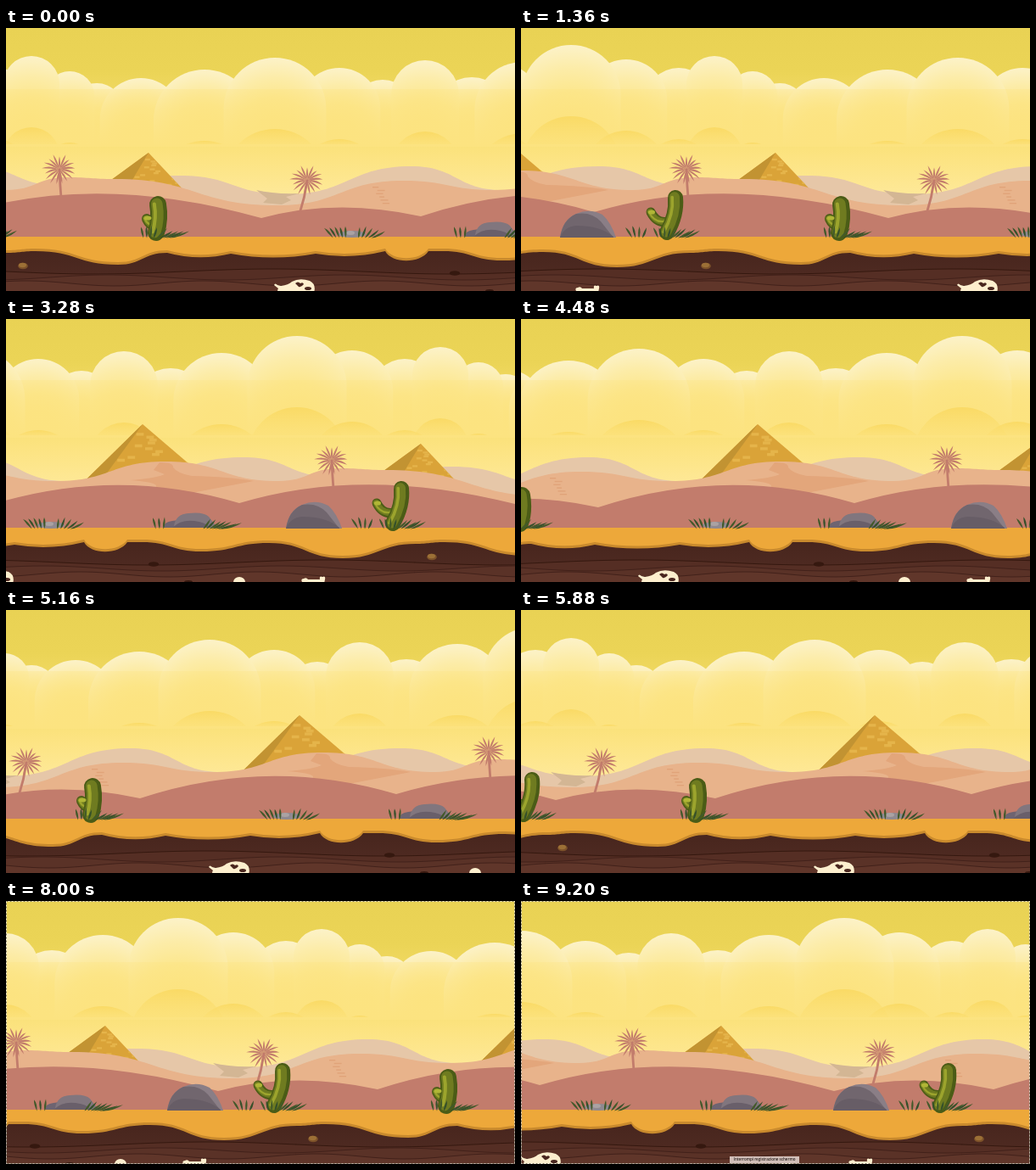
An HTML page with a canvas that plays this animation: 600 px wide and 310 px high, repeating every 9.24 s.

```html
<!DOCTYPE html>
<html lang="it">
<head>
<meta charset="utf-8">
<title>Desert parallax</title>
<style>
html, body { margin: 0; width: 100%; height: 100%; overflow: hidden; background: #e9d254; }
canvas { display: block; width: 100vw; height: 100vh; }
</style>
</head>
<body>
<canvas id="stage" width="600" height="310"></canvas>
<script>
const c = document.getElementById('stage').getContext('2d');
const W = 600, H = 310, TILE = 837, LOOP = 9240, STEP = 40;
const BONE = '#fdefce', ROSE = '#c27c6c', HAZE = '#fce380', DIRT = '#4a271f', DARK = '#35180f';

const rand = seed => {
  const v = Math.sin(seed * 12.9898) * 43758.5453;
  return v - Math.floor(v);
};

function shape(color, path) {
  c.fillStyle = color;
  c.fill(new Path2D(path));
}

function line(color, width, path) {
  c.strokeStyle = color;
  c.lineWidth = width;
  c.lineCap = 'round';
  c.stroke(new Path2D(path));
}

function oval(color, x, y, rx, ry) {
  c.fillStyle = color;
  c.beginPath();
  c.ellipse(x, y, rx, ry, 0, 0, Math.PI * 2);
  c.fill();
}

function stops(gradient, colors) {
  colors.forEach((color, i) => gradient.addColorStop(i / (colors.length - 1), color));
  return gradient;
}

const fade = (y0, y1, ...colors) => stops(c.createLinearGradient(0, y0, 0, y1), colors);

// Eased skyline through alternating crests and dips, [x, y] each.
const swell = points => points.slice(1).map(([x, y], i) => {
  const [px, py] = points[i], mid = (px + x) / 2;
  return `C${mid} ${py} ${mid} ${y} ${x} ${y}`;
}).join('');

function dunes(color, points) {
  const [x, y] = points[0];
  shape(color, `M${x} ${y}${swell([...points, [x + TILE, y]])}V${H}H${x}Z`);
}

// Pointed leaf from root to tip, with its middle lifted by bend.
function leaf(color, x, y, tx, ty, width, bend) {
  const len = Math.hypot(tx - x, ty - y) || 1;
  const nx = (y - ty) / len * width, ny = (tx - x) / len * width;
  const mx = (x + tx) / 2, my = (y + ty) / 2 - bend;
  shape(color, `M${x} ${y}Q${mx + nx} ${my + ny} ${tx} ${ty}Q${mx - nx} ${my - ny} ${x} ${y}Z`);
}

// Blades rooted around x, their tips spread between two positions.
function tuft(x, from, to, count) {
  for (let i = 0; i < count; i++) {
    const u = i / (count - 1);
    const tip = from + (to - from) * u;
    const root = x + (u - .5) * count * 3;
    const tall = 15 - Math.abs(tip - root) * .3 - rand(i + x) * 3;
    leaf(i % 2 ? '#35502a' : '#42592a', root, 247.5, tip, 247 - tall, 2.4, tip > root ? -1.5 : 1.5);
  }
}

// Clouds: centre and top; the radius follows from the gap between neighbours.
const cloudTops = [
  [30, 33], [75, 51], [107, 65], [159, 59], [234, 49], [317, 35], [393, 47],
  [444, 61], [494, 38], [549, 58], [609, 40], [698, 20], [763, 37], [825, 47]
];
const clouds = cloudTops.map(([x, top], i) => {
  const n = cloudTops.length;
  const gap = (cloudTops[(i + 1) % n][0] - cloudTops[(i + n - 1) % n][0] + TILE) % TILE;
  return { x, top, r: gap * .38 };
}).sort((a, b) => b.top - a.top);

function cloudPath(x, top, r, base) {
  c.beginPath();
  c.arc(x, top + r, r, Math.PI, 0);
  c.lineTo(x + r, base);
  c.lineTo(x - r, base);
  c.fill();
}

const cloudLayer = clouds.map(({ x, top, r }) => () => {
  const tall = 130 - top;
  c.translate(x, 130);
  c.scale(r / tall, 1);
  c.fillStyle = stops(c.createRadialGradient(0, 0, 0, 0, 0, tall),
    [HAZE, '#fce482', '#fce78e', '#fceca8', '#fcf2c8']);
  c.scale(tall / r, 1);
  cloudPath(0, -tall, r, 10);
});

const lowCloudLayer = clouds.filter(cloud => cloud.top < 52).map(({ x, top, r }) => () => {
  c.beginPath();
  c.rect(x - r, 90, r * 2, 47);
  c.clip();
  c.fillStyle = fade(top + 84, 139, 'rgba(249,215,92,.75)', 'rgba(251,222,112,.25)');
  cloudPath(x, top + 84, r, top + 84 + r);
});

function palm(x, y, bx, by) {
  line(ROSE, 2.8, `M${x} ${y}Q${x + (bx - x) * .3} ${(y + by) / 2} ${bx} ${by}`);
  for (let i = 0; i < 17; i++) {
    const a = i / 17 * Math.PI * 2 - Math.PI / 2;
    const len = 17 + rand(i) * 4;
    leaf(ROSE, x, y, x + Math.cos(a) * len, y + Math.sin(a) * len * .92, 2.1, 3 * Math.abs(Math.cos(a)));
  }
}

// Slopes give the horizontal run of each edge per unit of height.
function pyramid(x, y, h, left, ridge, right) {
  c.translate(x, y);
  shape('#daa338', `M0 0L${right * h} ${h}H${-left * h}Z`);
  c.clip(new Path2D(`M0 0L${right * h} ${h}H${-ridge * h}Z`));
  c.fillStyle = '#e5b44a';
  for (let i = 0; i < 14; i++) {
    const by = h * (.15 + i * .05);
    c.fillRect(by * (rand(i * 3) * (right + ridge) - ridge), by, h * .13, h * .05);
  }
  shape('#c29332', 'M0 0');
}

function pyramidShade(x, y, h, left, ridge) {
  shape('#c29332', `M${x} ${y}l${-left * h} ${h}h${(left - ridge) * h}Z`);
}

const hillLayer = [
  () => dunes('#e6c7a8', [[0, 168], [65, 186], [205, 174], [330, 196], [478, 163], [585, 191],
    [650, 191], [796, 163]].slice(1)),
  () => shape('#d3b694', 'M295 191Q315 196 346 195L330 199L336 203L325 208L303 206L308 201Z'),
  () => pyramid(168, 147, 46, 1.37, .6, .94),
  () => pyramidShade(168, 147, 46, 1.37, .6),
  () => pyramid(677, 124, 68, 1.02, .73, 1.17),
  () => pyramidShade(677, 124, 68, 1.02, .73),
  () => dunes('#e8b38b', [[0, 191], [72, 176], [128, 178], [320, 209], [468, 180], [575, 191], [704, 168]]),
  () => {
    shape('#e3a67b', 'M697 169Q714 169 713 175Q718 182 735 185Q780 186 808 191L735 205L690 200' +
      'Q703 193 662 190Q692 188 703 183L690 178Z');
    c.fillStyle = '#e0a379';
    for (let i = 0; i < 6; i++) c.fillRect(432 + i * 2 + rand(i) * 4, 187 + i * 3.8, 5 + rand(i + 9) * 4, 1.4);
  },
  () => palm(63, 167, 65, 200),
  () => palm(355, 180, 346, 219),
  () => shape(ROSE, 'M-46 217Q110 170 301 224Q390 200 489 222Q640 172 791 217V310H-46Z')
];

const scoop = (px, x, y, depth) => `Q${(px + x) / 2} ${y + depth * 2} ${x} ${y}`;
const sand = 'M0 246V262' + swell([[0, 262], [35, 260], [132, 276], [190, 262]]) +
  scoop(190, 265, 263, 4.5) + scoop(265, 365, 263, 4.5) + scoop(365, 447, 260, 5) +
  'C455 275 488 275 498 260' +
  swell([[498, 260], [515, 260], [585, 271], [665, 261], [752, 279], [838, 262]]) + 'V246Z';

const strata = (base, swing, turns, phase) => {
  let d = `M0 ${base + swing * Math.sin(phase)}`;
  for (let x = 9; x <= TILE; x += 9) {
    d += `L${x} ${base + swing * Math.sin(x / TILE * Math.PI * 2 * turns + phase)}`;
  }
  return d;
};

function limb(path, width) {
  line('#4b5c16', width, path);
  c.translate(-width * .06, -width * .03);
  line('#6f7b20', width * .68, path);
  c.translate(-width * .15, 0);
  line('#9ca42d', width * .2, path);
  c.translate(width * .21, width * .03);
}

const groundLayer = [
  () => {
    c.fillStyle = fade(260, 310, '#47251d', '#522d24');
    c.fillRect(0, 258, TILE, 52);
  },
  () => ['#552e24', '#5a3227', '#60362a'].forEach((color, i) => {
    const edge = strata(287 + i * 7, 3, 2 + i, i * 2);
    shape(color, `${edge}V${H}H0Z`);
    line(i ? '#42211a' : DARK, 1, edge);
  }),
  () => {
    oval('#7d522a', 20, 280.5, 5.8, 3.8);
    oval('#9c7036', 19.5, 279.5, 4.5, 2.7);
    oval(DARK, 529, 289, 6.2, 2.8);
    oval(DARK, 570, 310, 5, 2);
    oval(BONE, 630, 310, 7, 6);
    shape(BONE, 'M704 310Q702 306 706 306Q709 304 711 307H725Q724 302 728 304Q732 302 731 307L730 312H705Z');
  },
  () => {
    shape(BONE, 'M316 303Q317 300 320 303L324 304Q333 303 337 299Q346 294 358 298Q366 302 363 312H325Q318 311 321 307Z');
    shape(DIRT, 'M341 301Q344 298 347 301Q350 299 351 302Q348 306 345 305Z');
    oval(DIRT, 356, 307, 4, 2);
  },
  () => {
    c.translate(0, 3);
    shape('#c98a2d', sand);
    c.translate(0, -3);
    shape('#eda83a', sand);
  },
  () => {
    limb('M166 225Q170 234 178 232', 12);
    limb('M179 208Q182 225 177 241', 20);
    oval('#b0b636', 167, 224, 4.5, 2.5);
    tuft(168, 159, 178, 4);
    tuft(185, 190, 216, 5);
  },
  () => {
    oval('#8f8990', 408, 243, 16, 4);
    oval('#aaa2a3', 406, 241.5, 5, 2.5);
    tuft(393, 375, 400, 5);
    tuft(423, 417, 447, 5);
  },
  () => {
    shape('#6e6471', 'M541 246Q541 239 551 238L566 236L575 246Z');
    shape('#81767e', 'M553 244Q555 230 570 229Q588 227 594 233L604 246H552Z');
    shape('#695f6a', 'M551 246Q561 236 577 238Q589 239 596 246Z');
    tuft(536, 528, 542, 3);
    tuft(598, 596, 633, 7);
  },
  () => {
    shape('#8a7e86', 'M685 247Q688 226 704 219Q720 212 735 220Q745 229 751 247Z');
    shape('#71666e', 'M685 247Q688 226 704 219Q722 216 733 228L748 247Z');
    shape('#675d66', 'M685 247Q690 234 704 233Q733 233 748 246V247Z');
    tuft(776, 762, 787, 4);
  },
  () => {
    limb('M792 217Q799 231 812 228', 11);
    limb('M821 200Q823 220 811 241', 18);
    oval('#b0b636', 793, 217, 4, 2.6);
    tuft(808, 795, 822, 5);
    tuft(824, 828, 850, 5);
  }
];

function scroll(layer, offset) {
  const x = offset % TILE;
  for (const draw of layer) {
    for (const start of [x - TILE, x]) {
      c.save();
      c.translate(start, 0);
      draw();
      c.restore();
    }
  }
}

function recorderOverlay(t) {
  if (t < 7400) return;
  c.lineWidth = 1;
  c.lineCap = 'butt';
  c.strokeStyle = 'rgba(255,255,255,.6)';
  c.strokeRect(.5, .5, W - 1, H - 1);
  c.setLineDash([2, 2]);
  c.strokeStyle = 'rgba(90,80,50,.75)';
  c.strokeRect(.5, .5, W - 1, H - 1);
  c.setLineDash([]);
  if (t < 9000) return;
  c.fillStyle = '#d2bfb9';
  c.fillRect(246, 301, 82, 8);
  c.fillStyle = '#2c2422';
  c.font = '600 4.5px "Open Sans", sans-serif';
  c.textAlign = 'center';
  c.textBaseline = 'middle';
  c.fillText('Interrompi registrazione schermo', 287, 305.2);
}

function render(now) {
  const t = Math.floor(now % LOOP / STEP) * STEP;
  const distance = Math.max(0, t * .1478 - 3);
  const near = Math.round(distance), far = Math.round(distance * 2 / 3);

  c.fillStyle = fade(0, 200, '#e9d254', '#ebd456', '#f4dc6a', HAZE, '#fee99a');
  c.fillRect(0, 0, W, H);
  scroll(cloudLayer, near);
  // Haze dissolves the cloud columns into the sky.
  c.fillStyle = fade(50, 140, 'rgba(252,227,128,0)', 'rgba(252,227,128,.6)', HAZE);
  c.save();
  c.globalCompositeOperation = 'source-over';
  c.fillRect(0, 72, W, 68);
  c.restore();
  scroll(lowCloudLayer, near);
  scroll(hillLayer, far);
  scroll(groundLayer, near);
  recorderOverlay(t);
}

const began = performance.now();
(function tick() {
  render(performance.now() - began);
  requestAnimationFrame(tick);
})();
</script>
</body>
</html>
```
